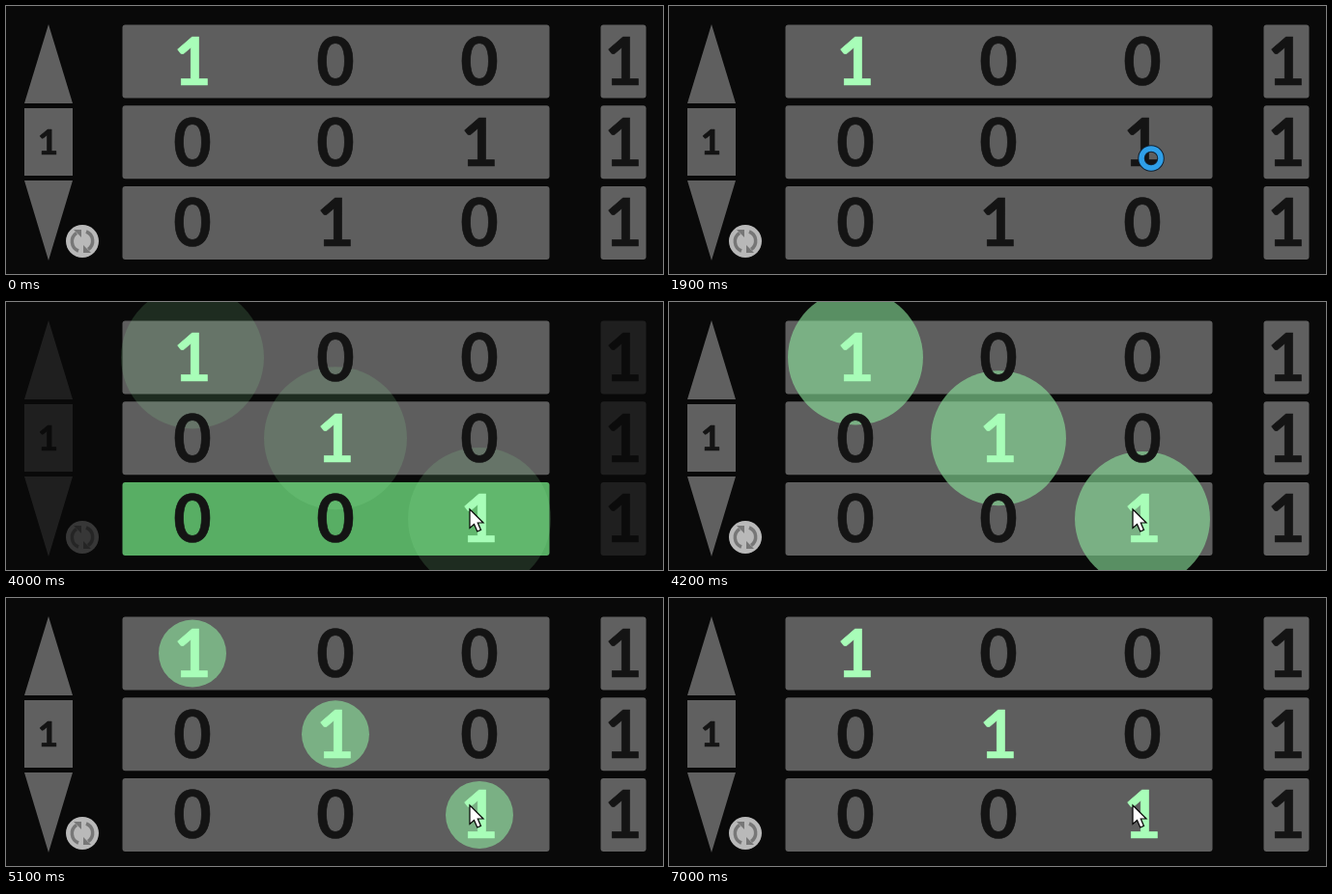
Write an HTML page that moves like this. It is 680 px wide and 278 px high and loops after 7.1 s.

```html
<!DOCTYPE html>
<html>
<head>
<meta charset="utf-8">
<style>
html, body { margin: 0; width: 100%; height: 100%; overflow: hidden; background: #090909; }
svg { display: block; width: 680px; height: 278px; }
text { font: 700 68px Lato, sans-serif; text-anchor: middle; fill: #141414; stroke: #141414; stroke-width: .6; stroke-linejoin: round; }
text.lit { fill: #a8fdb8; stroke: #a8fdb8; }
text.small { font-size: 37px; }
</style>
</head>
<body>
<svg id="stage" viewBox="0 0 680 278">
  <rect width="680" height="278" fill="#090909"/>
  <g id="sides">
    <g fill="#606060">
      <path d="M44 19L69 101H19ZM19 106H69V176H19ZM19 181H69L44 264Z"/>
    </g>
    <text class="small" x="43.5" y="154">1</text>
    <circle cx="79" cy="244" r="17" fill="#b9b9b9"/>
    <g fill="none" stroke="#777" stroke-width="3.5">
      <path id="turn" d="M75 254A10.5 10.5 0 0 1 73 235.500"/>
      <path d="M83 234A10.500 10.500 0 0 1 85 252.500"/>
    </g>
    <path d="M70 232H78V240ZM88 256H80V248Z" fill="#777"/>
  </g>
  <g id="bars"></g>
  <g id="discs" fill="#8ee89f"></g>
  <g id="digits"></g>
  <g id="ring" fill="none">
    <circle r="10" stroke="#123" stroke-width="7.500"/>
    <circle r="10" stroke="#2f9fe8" stroke-width="5.500"/>
  </g>
  <path id="arrow" d="M0 0V19.500L4.500 15.500L7.800 23L11.500 21.400L8.300 14H14Z" fill="#fff" stroke="#000" stroke-width="1.200"/>
</svg>
<script>
const LOOP = 7100, PITCH = 83.7, COLS = [193, 341, 490];
const ROWS = ['100', '001', '010'];
const $ = id => document.getElementById(id);

function add(parent, tag, attrs, label) {
  const el = document.createElementNS('http://www.w3.org/2000/svg', tag);
  for (const k in attrs) el.setAttribute(k, attrs[k]);
  if (label) el.textContent = label;
  parent.appendChild(el);
  return el;
}

const rows = ROWS.map((bits, i) => {
  const bar = add($('bars'), 'rect', { x: 120.5, y: 19.5, width: 442, height: 76, rx: 3 });
  const group = add($('digits'), 'g', {});
  const digits = [...bits].map((b, c) => add(group, 'text', { x: COLS[c], y: 82 }, b));
  const y = i * PITCH;
  add($('sides'), 'rect', { x: 615.5, y: 19.5 + y, width: 47, height: 76, rx: 3, fill: '#606060' });
  add($('sides'), 'text', { x: 639, y: 82 + y }, '1');
  return { bar, group, digits };
});
const discs = COLS.map((x, i) => add($('discs'), 'circle', { cx: x, cy: 57.5 + i * PITCH }));

const clamp = v => Math.max(0, Math.min(1, v));
const ramp = (t, a, b) => clamp((t - a) / (b - a));
const smooth = u => u * u * (3 - 2 * u);
const mix = (a, b, u) => a + (b - a) * u;

// Smooth curve through [time, value] points
function curve(keys, t) {
  const last = keys.length - 1;
  if (t <= keys[0][0]) return keys[0][1];
  if (t >= keys[last][0]) return keys[last][1];
  const i = keys.findIndex(k => k[0] > t) - 1;
  const slope = j => j <= 0 || j >= last ? 0 :
    (keys[j + 1][1] - keys[j - 1][1]) / (keys[j + 1][0] - keys[j - 1][0]);
  const [t0, a] = keys[i], [t1, b] = keys[i + 1], d = t1 - t0, u = (t - t0) / d;
  const s = smooth(u);
  return mix(a, b, s) + d * u * (1 - u) * ((1 - u) * slope(i) - u * slope(i + 1));
}

const RADIUS = [[4000, 74], [4200, 70], [4700, 45.5], [5100, 35], [5300, 33.5], [5700, 42], [6100, 53.5], [6500, 57]];
const DRAG_X = [[2950, 499], [3100, 481], [3500, 480]];
const DRAG_Y = [[2950, 158], [3100, 180], [3500, 215]];

const place = (el, x, y) => el.setAttribute('transform', `translate(${x} ${y})`);
const show = (el, on) => el.setAttribute('visibility', on ? 'visible' : 'hidden');

function draw(t) {
  const away = ramp(t, 1900, 2200) * (1 - ramp(t, 3950, 4200));
  $('sides').setAttribute('opacity', mix(1, .07, away));

  const swap = smooth(ramp(t, 3150, 3500));
  const slots = [0, 1 + swap, 2 - swap];
  const solved = t >= 4000;
  rows.forEach(({ bar, group, digits }, i) => {
    place(bar, 0, slots[i] * PITCH);
    place(group, 0, slots[i] * PITCH);
    const g = i === 1 ? away : 0;
    bar.setAttribute('fill', `rgb(${mix(94, 86, g)},${mix(94, 194, g)},${mix(94, 102, g)})`);
    digits.forEach((d, c) => d.setAttribute('class', ROWS[i][c] === '1' && (i === 0 || solved) ? 'lit' : ''));
  });

  const r = curve(RADIUS, t);
  discs.forEach(d => d.setAttribute('r', r));
  $('discs').setAttribute('opacity', 1);
  const alpha = .6 * ramp(t, 3950, 4150) * (1 - ramp(t, 6550, 6900));
  discs.forEach(d => d.setAttribute('fill-opacity', alpha));

  const enter = 1 - (1 - ramp(t, 400, 1350)) ** 2;
  place($('ring'), mix(610, 499, enter), mix(292, 158, enter));
  show($('ring'), t >= 400 && t < 2000);
  place($('arrow'), curve(DRAG_X, t), curve(DRAG_Y, t));
  show($('arrow'), t >= 2000);
}

function tick() {
  draw(performance.now() % LOOP);
  requestAnimationFrame(tick);
}
tick();
</script>
</body>
</html>
```
